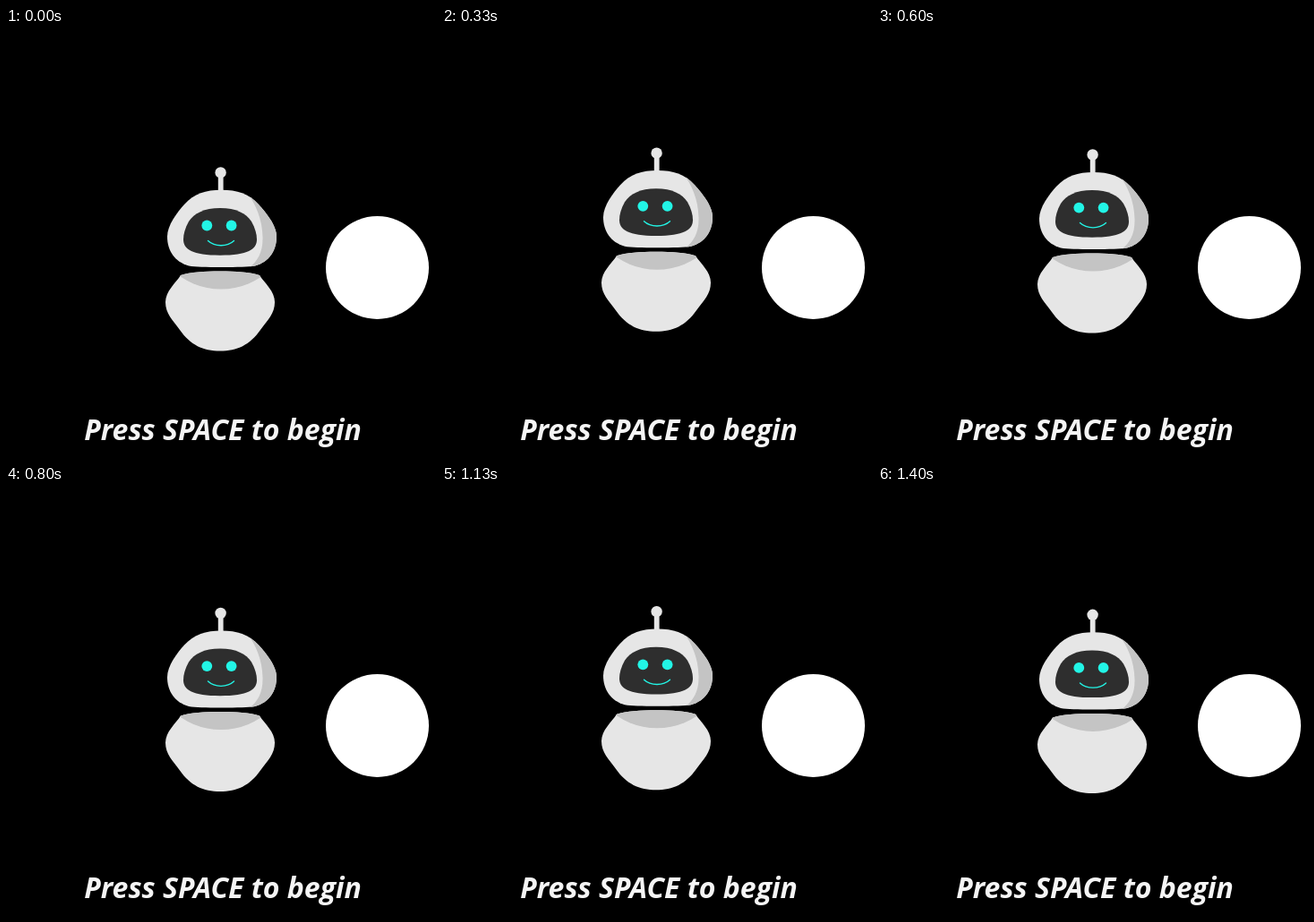
An HTML page with a canvas that plays this animation: 480 by 480 pixels, repeating every 1670 ms.

```html
<!DOCTYPE html>
<html lang="en">
<head>
<meta charset="utf-8">
<title>Robot start screen</title>
<style>
  html, body { margin: 0; width: 100%; height: 100%; overflow: hidden; background: #000; }
  canvas { display: block; width: 480px; height: 480px; }
</style>
</head>
<body>
<canvas id="stage" width="480" height="480"></canvas>
<script>
const ctx = document.getElementById('stage').getContext('2d');
const LOOP = 1670;
const STEPS_PER_MS = 15 / 1000;
const LAST_STEP = 21;
const LIGHT = '#e6e6e6', SHADE = '#c4c4c4', DARK = '#2e2e2e', CYAN = '#22f5e6';

// Hover height: [step, vertical offset]
const HOVER = [
  [0, 0], [3, -12], [5, -21.7], [6.5, -24.4], [8, -22.5], [9, -19.9],
  [10.5, -18.4], [12, -19.4], [14.5, -22.6], [17, -21.2], [21, -17.6]
];

const HEAD = new Path2D(
  'M240.5 180.8C258 180.8 271 185 282 197C290 206 302 220 302 233' +
  'C302 248 294 261 278 265.5C271 266.8 258 267 240.5 267' +
  'C223 267 211 266.8 204 265.5C188 261 180 248 180 233' +
  'C180 220 191 206 199 197C210 185 223 180.8 240.5 180.8Z');
const HEAD_SHADE = new Path2D(
  'M269 184C279 197 286 213 286.5 233C287 250 281 260 272 267L305 267L305 184Z');
const FACE = new Path2D(
  'M239 201C257 201 268 207 274 216C278 223 280 230 280 236' +
  'C280 247 270 253.7 239 253.7C208 253.7 198 247 198 236' +
  'C198 230 200 223 204 216C210 207 221 201 239 201Z');
const SMILE = new Path2D('M225.5 237.5C233 244.5 247 244.5 254.5 237.5');
const BODY = new Path2D(
  'M239 271.5C257 271.5 272 272.5 283 276C289 285 300 294 300 306' +
  'C300 319 292 326 284 337C272 354 258 360.5 239 360.5' +
  'C220 360.5 206 354 194 337C186 326 178 319 178 306' +
  'C178 294 189 285 195 276C206 272.5 221 271.5 239 271.5Z');
const BODY_SHADE = new Path2D();
BODY_SHADE.arc(240, 211.5, 80, 0, 2 * Math.PI);

function slope(i) {
  const a = HOVER[Math.max(i - 1, 0)];
  const b = HOVER[Math.min(i + 1, HOVER.length - 1)];
  return (b[1] - a[1]) / (b[0] - a[0]);
}

function hover(step) {
  let i = 0;
  while (i < HOVER.length - 2 && step > HOVER[i + 1][0]) i++;
  const [x0, y0] = HOVER[i], [x1, y1] = HOVER[i + 1];
  const span = x1 - x0, u = (step - x0) / span, v = 1 - u;
  return y0 * v * v * (1 + 2 * u) + y1 * u * u * (3 - 2 * u) +
    span * u * v * (slope(i) * v - slope(i + 1) * u);
}

function fill(path, color) {
  ctx.fillStyle = color;
  ctx.fill(path);
}

function disc(x, y, r, color) {
  ctx.fillStyle = color;
  ctx.beginPath();
  ctx.arc(x, y, r, 0, 2 * Math.PI);
  ctx.fill();
}

function shaded(shape, shade) {
  fill(shape, LIGHT);
  ctx.save();
  ctx.clip(shape);
  fill(shade, SHADE);
  ctx.restore();
}

function drawRobot(dy) {
  ctx.save();
  ctx.translate(0, dy);
  disc(239.6, 161.4, 6.2, LIGHT);
  ctx.fillRect(236.8, 164, 5.8, 20);
  shaded(HEAD, HEAD_SHADE);
  fill(FACE, DARK);
  disc(224.3, 220.5, 5.9, CYAN);
  disc(251.6, 220.5, 5.9, CYAN);
  ctx.strokeStyle = CYAN;
  ctx.lineWidth = 1.4;
  ctx.lineCap = 'round';
  ctx.stroke(SMILE);
  shaded(BODY, BODY_SHADE);
  ctx.restore();
}

function draw(ms) {
  const step = Math.min(LAST_STEP, Math.floor((ms % LOOP) * STEPS_PER_MS + 0.06));
  ctx.fillStyle = '#000';
  ctx.fillRect(0, 0, 480, 480);
  drawRobot(hover(step));
  disc(414.5, 267.5, 57.5, '#fff');
  ctx.fillStyle = '#f5f5f5';
  ctx.font = 'italic 700 32px "Open Sans", sans-serif';
  ctx.textAlign = 'center';
  ctx.fillText('Press SPACE to begin', 242, 460);
}

const start = performance.now();
function tick() {
  draw(performance.now() - start);
  requestAnimationFrame(tick);
}
tick();
</script>
</body>
</html>
```
